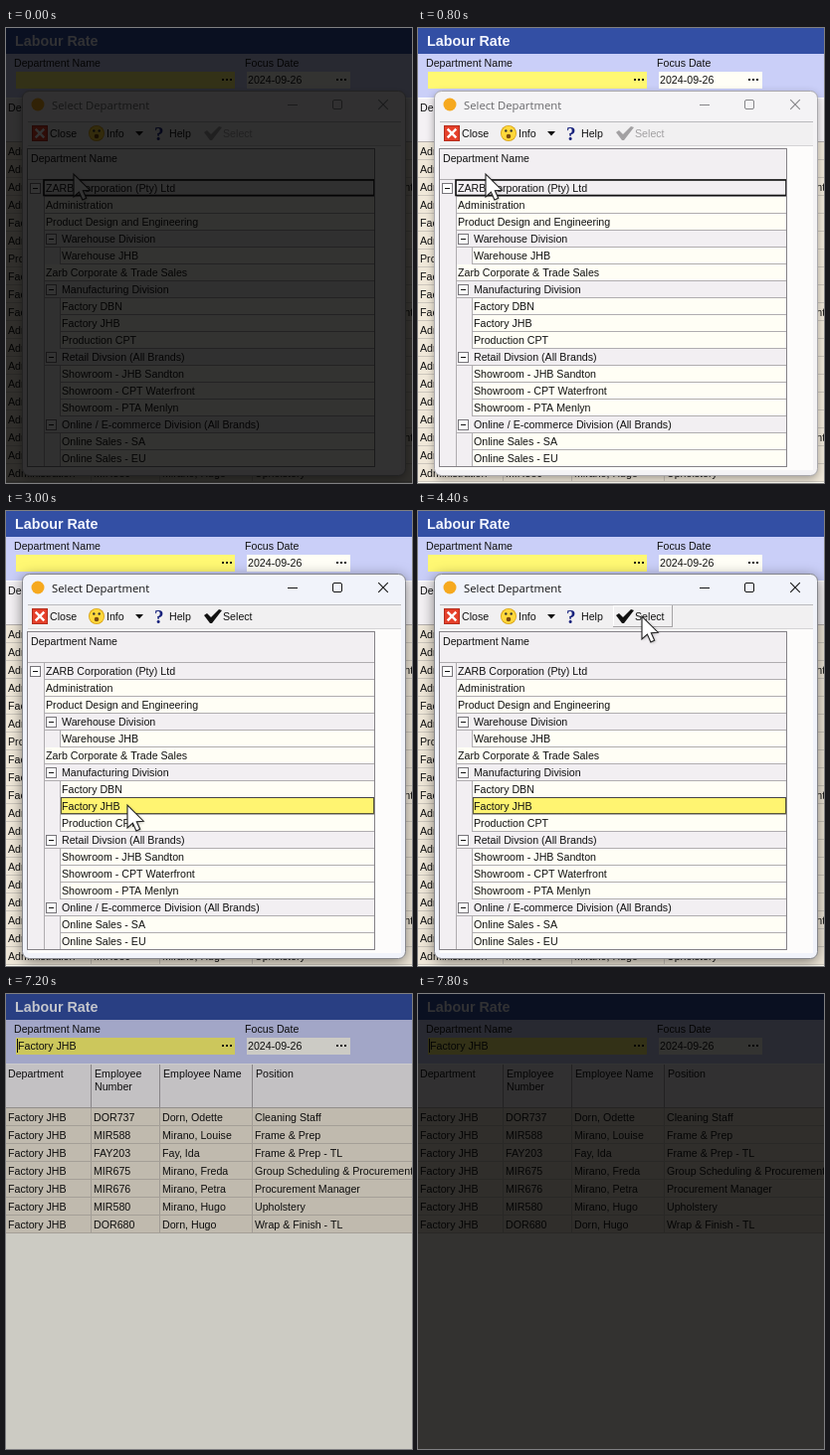
Animation of 408 by 458 pixels, one loop 8 s. Source, as an HTML page with a canvas:

```html
<!DOCTYPE html>
<html lang="en">
<head>
<meta charset="utf-8">
<title>Labour Rate</title>
<style>
html, body { margin: 0; height: 100%; overflow: hidden; }
canvas { display: block; }
</style>
</head>
<body>
<canvas id="stage" width="408" height="458"></canvas>
<script>
const ctx = document.getElementById('stage').getContext('2d');
const LOOP = 8000, STEP = 200;
const SANS = '"Liberation Sans", Arial, sans-serif';
const BODY = `10.65px ${SANS}`;

const staff = [
  ['DOR737', 'Dorn, Odette', 'Cleaning Staff'],
  ['MIR588', 'Mirano, Louise', 'Frame & Prep'],
  ['FAY203', 'Fay, Ida', 'Frame & Prep - TL'],
  ['MIR675', 'Mirano, Freda', 'Group Scheduling & Procurement'],
  ['MIR676', 'Mirano, Petra', 'Procurement Manager'],
  ['MIR580', 'Mirano, Hugo', 'Upholstery'],
  ['DOR680', 'Dorn, Hugo', 'Wrap & Finish - TL']
];

// Department initials: A = Administration, F = Factory JHB, P = Production CPT
const allRows = [...'AAAAFAPFFFAAAAAAAAA'];
const deptNames = { A: 'Administration', F: 'Factory JHB', P: 'Production CPT' };

// [indent level, label, is a group]
const tree = [
  [0, 'ZARB Corporation (Pty) Ltd', true],
  [1, 'Administration'],
  [1, 'Product Design and Engineering'],
  [1, 'Warehouse Division', true],
  [2, 'Warehouse JHB'],
  [1, 'Zarb Corporate & Trade Sales'],
  [1, 'Manufacturing Division', true],
  [2, 'Factory DBN'],
  [2, 'Factory JHB'],
  [2, 'Production CPT'],
  [1, 'Retail Divsion (All Brands)', true],
  [2, 'Showroom - JHB Sandton'],
  [2, 'Showroom - CPT Waterfront'],
  [2, 'Showroom - PTA Menlyn'],
  [1, 'Online / E-commerce Division (All Brands)', true],
  [2, 'Online Sales - SA'],
  [2, 'Online Sales - EU']
];

function box(x, y, w, h, color) {
  ctx.fillStyle = color;
  ctx.fillRect(x, y, w, h);
}

function frame(x, y, w, h, color) {
  ctx.strokeStyle = color;
  ctx.lineWidth = 1;
  ctx.strokeRect(x + 0.5, y + 0.5, w - 1, h - 1);
}

function text(s, x, y, color = '#111', font = BODY) {
  ctx.font = font;
  ctx.fillStyle = color;
  ctx.fillText(s, x, y);
}

function path(points, color, width = 1) {
  ctx.beginPath();
  points.forEach(([x, y]) => ctx.lineTo(x, y));
  ctx.strokeStyle = color;
  ctx.lineWidth = width;
  ctx.stroke();
}

function shape(points, color) {
  ctx.beginPath();
  points.forEach(([x, y]) => ctx.lineTo(x, y));
  ctx.closePath();
  ctx.fillStyle = color;
  ctx.fill();
}

function disc(x, y, r, color) {
  ctx.beginPath();
  ctx.arc(x, y, r, 0, 7);
  ctx.fillStyle = color;
  ctx.fill();
}

function cross(x, y, r, color, width) {
  path([[x - r, y - r], [x + r, y + r]], color, width);
  path([[x - r, y + r], [x + r, y - r]], color, width);
}

function dots(x) {
  for (let i = 0; i < 3; i++) box(x + 4 * i, 51, 2, 2, '#111');
}

function drawPage(filtered) {
  box(0, 0, 408, 458, '#fffdf3');
  box(0, 0, 408, 26, '#334fa4');
  text('Labour Rate', 9, 18, '#f4f6ff', `bold 14.3px ${SANS}`);
  box(0, 26, 408, 44, '#cacff8');
  text('Department Name', 8, 39);
  text('Focus Date', 240, 39);
  box(10, 44, 220, 17, '#fff873');
  box(242, 44, 104, 17, '#fffef6');
  dots(217);
  dots(332);
  text('2024-09-26', 243, 56);
  if (filtered) {
    box(11, 45, 1, 14, '#111');
    text('Factory JHB', 12, 56);
  }

  const rows = filtered ? staff : allRows;
  const bottom = 115 + 18 * rows.length;
  box(0, 70, 408, 45, '#f4f1f4');
  box(0, 70, 408, 1, '#fff');
  box(0, 114, 408, 1, '#b5b0ae');
  box(0, 115, 408, bottom - 115, '#f0e8d9');
  for (const x of [85, 154, 247]) {
    box(x, 71, 1, 43, '#aaa6aa');
    box(x, 115, 1, bottom - 115, '#c9c3ba');
  }
  text('Department', 2, 84);
  text('Employee', 89, 84);
  text('Number', 89, 97);
  text('Employee Name', 158, 84);
  text('Position', 251, 84);
  rows.forEach((row, i) => {
    const y = 115 + 18 * i;
    const [id, name, job] = filtered ? row : staff[(i + 1) % 7];
    box(0, y + 17, 408, 1, '#cdc7bd');
    text(filtered ? 'Factory JHB' : deptNames[row], 2, y + 13);
    text(id, 88, y + 13);
    text(name, 157, y + 13);
    text(!filtered && i === 9 ? staff[3][2] : job, 250, y + 13);
  });
}

function drawToolbar(active, hover, pressed) {
  box(22, 95, 375, 24, '#f1f0f1');
  box(22, 94, 375, 1, '#b9b9bd');
  box(22, 118, 375, 1, '#d5d3d5');

  box(26, 98, 16, 16, '#e5402a');
  frame(26, 98, 16, 16, '#b52c1c');
  cross(34, 106, 4.3, '#fff', 2.4);
  text('Close', 44, 110);

  disc(91, 106, 8, '#d9a312');
  disc(91, 106, 7.2, '#ffd83c');
  disc(88.3, 103.5, 1.2, '#333');
  disc(93.7, 103.5, 1.2, '#333');
  disc(91, 109, 2.3, '#7a4a10');
  text('Info', 101, 110);
  shape([[130, 104], [138, 104], [134, 108.5]], '#111');

  text('?', 149, 113, '#18227c', 'bold 19px "Liberation Serif", serif');
  text('Help', 164, 110);

  const shift = pressed ? 1 : 0;
  if (hover) {
    frame(196, 95, 60, 22, pressed ? '#fff' : '#a5a3a5');
    const edge = pressed ? '#a5a3a5' : '#fff';
    box(196, 95, 59, 1, edge);
    box(196, 95, 1, 21, edge);
  }
  const ink = active ? '#111' : '#a2a0a2';
  ctx.save();
  ctx.translate(shift, shift);
  shape([[199, 105], [202, 103], [206, 107], [214, 99], [217, 100], [207, 113], [205, 113]], ink);
  text('Select', 218, 110, ink);
  ctx.restore();
}

function drawTree(active) {
  box(22, 122, 349, 320, '#f2eff2');
  text('Department Name', 25, 135);
  box(22, 152, 349, 1, '#b0adb0');
  tree.forEach(([level, label, group], i) => {
    const y = 153 + 17 * i;
    const left = level === 2 ? 54 : 38;
    const textX = level === 2 || (level === 1 && group) ? 56 : 40;
    if (!group) box(left, y, 332 - left + 38, 16, '#fffef5');
    if (active && i === 8) {
      box(left + 1, y, 315, 16, '#fff471');
      ctx.setLineDash([1, 1]);
      frame(left + 1, y - 1, 315, 17, '#222');
      ctx.setLineDash([]);
    }
    box(left, y + 16, 370 - left, 1, '#b0adb0');
    box(38, y, 1, 17, '#b0adb0');
    if (level === 2) box(54, y, 1, 17, '#b0adb0');
    if (group) {
      const x = level ? 40 : 24;
      box(x, y + 3, 11, 11, '#fff');
      frame(x, y + 3, 11, 11, '#77757a');
      box(x + 3, y + 8, 5, 1, '#111');
    }
    text(label, textX, y + 11.5);
  });
  if (active) {
    ctx.setLineDash([1, 1]);
    frame(55, 288, 315, 17, '#222');
    ctx.setLineDash([]);
  } else {
    ctx.strokeStyle = '#111';
    ctx.lineWidth = 1.6;
    ctx.strokeRect(38, 153, 332, 15.5);
  }
  frame(21, 121, 350, 321, '#858287');
}

function drawDialog(active, hover, pressed) {
  ctx.save();
  ctx.shadowColor = active ? 'rgba(0,0,0,.5)' : 'rgba(0,0,0,.35)';
  ctx.shadowBlur = active ? 14 : 9;
  ctx.shadowOffsetY = 3;
  ctx.beginPath();
  ctx.roundRect(16.5, 63.5, 385, 387, 7);
  ctx.fillStyle = active ? '#f1f3fa' : '#f4f3f5';
  ctx.fill();
  ctx.restore();
  ctx.strokeStyle = active ? '#85868c' : '#aaa9ad';
  ctx.lineWidth = 1;
  ctx.stroke();

  const ink = active ? '#151515' : '#858588';
  disc(32, 77, 6.5, '#f6a91f');
  text('Select Department', 46, 82, active ? '#151515' : '#68686b', '11.3px "Open Sans", "Noto Sans", sans-serif');
  box(283, 77, 10, 1, ink);
  ctx.beginPath();
  ctx.roundRect(328.5, 72.5, 9, 9, 1.5);
  ctx.strokeStyle = ink;
  ctx.stroke();
  cross(379, 77, 4.8, ink, 1.1);

  box(22, 95, 375, 350, '#fdfcfb');
  drawToolbar(active, hover, pressed);
  drawTree(active);
}

function drawCursor(x, y) {
  const arrow = [[0, 0], [0, 17], [4, 13.4], [6.6, 19.2], [9.4, 18], [6.9, 12.4], [12, 12]];
  const points = arrow.map(([dx, dy]) => [x + dx * 1.35, y + dy * 1.35]);
  ctx.save();
  ctx.shadowColor = 'rgba(0,0,0,.3)';
  ctx.shadowBlur = 3;
  ctx.shadowOffsetX = ctx.shadowOffsetY = 1;
  shape(points, '#fff');
  ctx.restore();
  path([...points, points[0], points[1]], '#222', 1.1);
}

function ease(t, from, to) {
  const p = Math.min(1, Math.max(0, (t - from) / (to - from)));
  return p * p * (3 - 2 * p);
}

function draw(t) {
  const closed = t >= 5000;
  drawPage(closed);
  if (!closed) {
    drawDialog(t >= 2600, t >= 4200, t >= 4600);
    const a = ease(t, 1200, 2400), b = ease(t, 3200, 4400);
    drawCursor(68 + 54 * a + 103 * b, 147 + 149 * a - 190 * b);
  }
  const light = Math.min(1, 0.2 + t / 1000, (LOOP - t) / 1000);
  if (light < 1) box(0, 0, 408, 458, `rgba(0,0,0,${1 - light})`);
}

const start = performance.now();
function tick() {
  const t = (performance.now() - start) % LOOP;
  draw(Math.floor(t / STEP) * STEP);
  requestAnimationFrame(tick);
}
tick();
</script>
</body>
</html>
```
